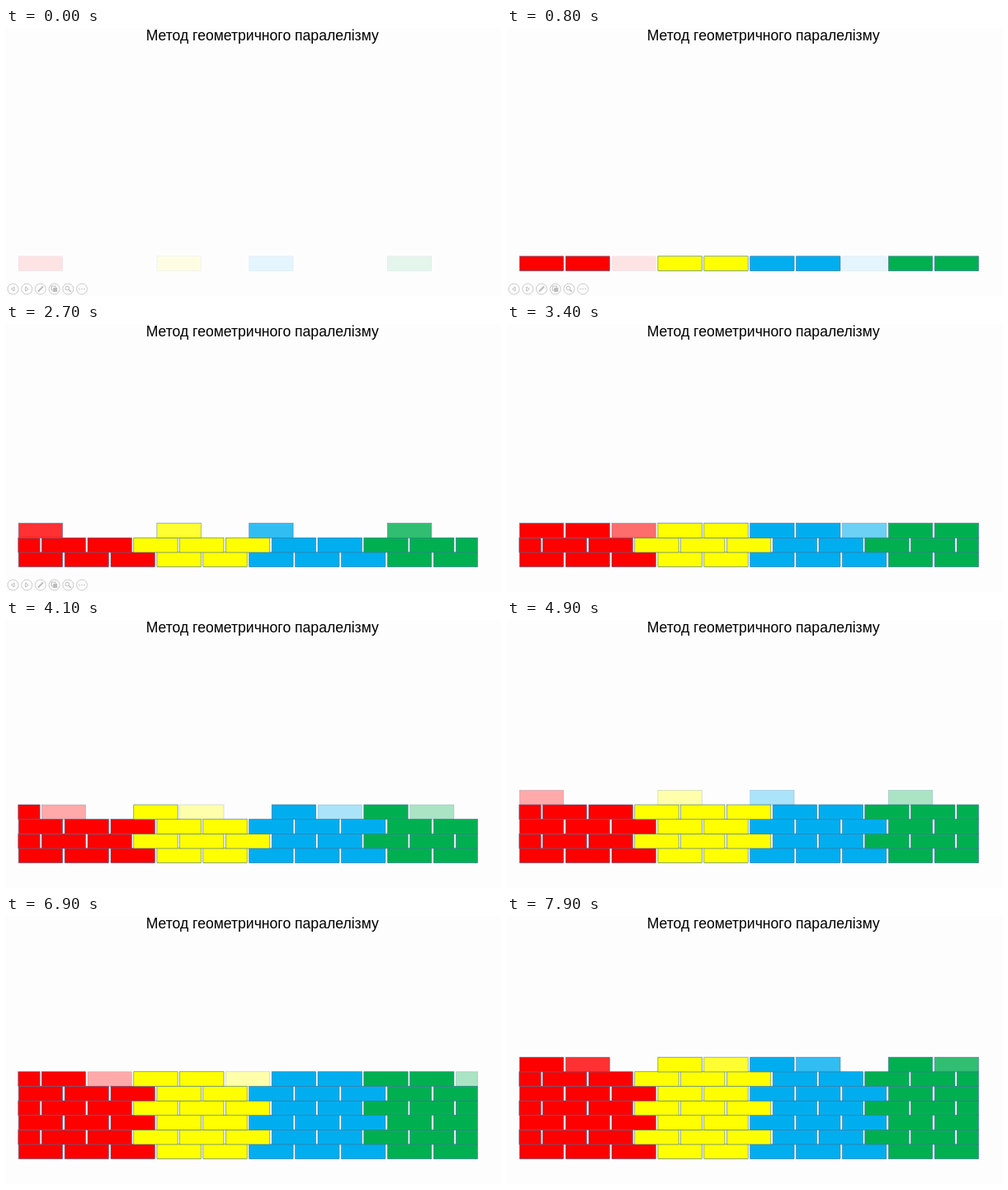
Recreate the animation shown at these times as an HTML page with a canvas. Size 600 by 325 pixels, loop 8000 ms.

```html
<!DOCTYPE html>
<html lang="uk">
<head>
<meta charset="utf-8">
<title>Метод геометричного паралелізму</title>
<style>
html, body { margin: 0; width: 100%; height: 100%; overflow: hidden; background: #fefdfe; }
canvas { display: block; }
</style>
</head>
<body>
<canvas id="stage" width="600" height="325"></canvas>
<script>
const ctx = document.getElementById('stage').getContext('2d');
const LOOP = 8000, STEP = 100, STEPS_PER_WAVE = 4, WAVES_PER_ROW = 3;
const TOOLBAR_END = 3200;
const BRICK_W = 53.4, HALF_W = 26.3, BRICK_H = 17.8;
const COLORS = ['#ff0000', '#ffff00', '#00aeef', '#00b050'];
// bricks laid by each worker in even and odd rows
const COUNTS = [[3, 2, 3, 2], [3, 3, 2, 3]];

function brickBox(row, i) {
  const y = 276.8 - 17.6 * row;
  if (row % 2 === 0) return [15.2 + 55.9 * i, y, BRICK_W];
  if (i === 0) return [14.8, y, HALF_W];
  return [43.2 + 55.8 * (i - 1), y, i === 10 ? HALF_W : BRICK_W];
}

function drawBrick(row, i, color, alpha) {
  const [x, y, w] = brickBox(row, i);
  ctx.globalAlpha = alpha;
  ctx.fillStyle = color;
  ctx.fillRect(x, y, w, BRICK_H);
  ctx.strokeStyle = '#41719c';
  ctx.lineWidth = 0.6;
  ctx.strokeRect(x, y, w, BRICK_H);
  ctx.globalAlpha = 1;
}

function drawWave(wave, alpha) {
  const row = Math.floor(wave / WAVES_PER_ROW), n = wave % WAVES_PER_ROW;
  let first = 0;
  COUNTS[row % 2].forEach((count, k) => {
    if (n < count) drawBrick(row, first + n, COLORS[k], alpha);
    first += count;
  });
}

function line(points, close) {
  ctx.beginPath();
  points.forEach(([x, y]) => ctx.lineTo(x, y));
  if (close) ctx.closePath();
  ctx.stroke();
}

function disc(x, y, r, fill) {
  ctx.beginPath();
  ctx.arc(x, y, r, 0, Math.PI * 2);
  fill ? ctx.fill() : ctx.stroke();
}

const ICONS = [
  () => line([[1.5, -2.5], [-2, 0], [1.5, 2.5]], true),
  () => line([[-1.5, -2.5], [2, 0], [-1.5, 2.5]], true),
  () => { ctx.lineWidth = 2; line([[-3, 3], [3, -3]]); },
  () => { ctx.strokeRect(-3.5, -3.5, 5, 5); ctx.fillRect(-1.5, -1.5, 5, 5); },
  () => { disc(-1, -1, 2.3); ctx.lineWidth = 1.5; line([[1, 1], [3.5, 3.5]]); },
  () => [-3, 0, 3].forEach(x => disc(x, 0, 0.8, true))
];

function drawToolbar() {
  ICONS.forEach((icon, i) => {
    ctx.save();
    ctx.translate(8.5 + 16.7 * i, 316.5);
    ctx.strokeStyle = ctx.fillStyle = '#cbcbcb';
    ctx.lineWidth = 1;
    disc(0, 0, 6.5);
    ctx.strokeStyle = ctx.fillStyle = '#bcbcbc';
    icon();
    ctx.restore();
  });
}

function draw(time) {
  const step = Math.floor((time % LOOP) / STEP);
  const wave = Math.floor(step / STEPS_PER_WAVE);
  ctx.fillStyle = '#fefdfe';
  ctx.fillRect(0, 0, 600, 325);
  ctx.fillStyle = '#000';
  ctx.font = '17.6px "Liberation Sans", Arial, sans-serif';
  ctx.textAlign = 'center';
  ctx.fillText('Метод геометричного паралелізму', 310.7, 15);
  for (let w = 0; w < wave; w++) drawWave(w, 1);
  drawWave(wave, 0.1 + 0.235 * (step % STEPS_PER_WAVE));
  if (step * STEP < TOOLBAR_END) drawToolbar();
}

const start = performance.now();
function tick() {
  draw(performance.now() - start);
  requestAnimationFrame(tick);
}
tick();
</script>
</body>
</html>
```
